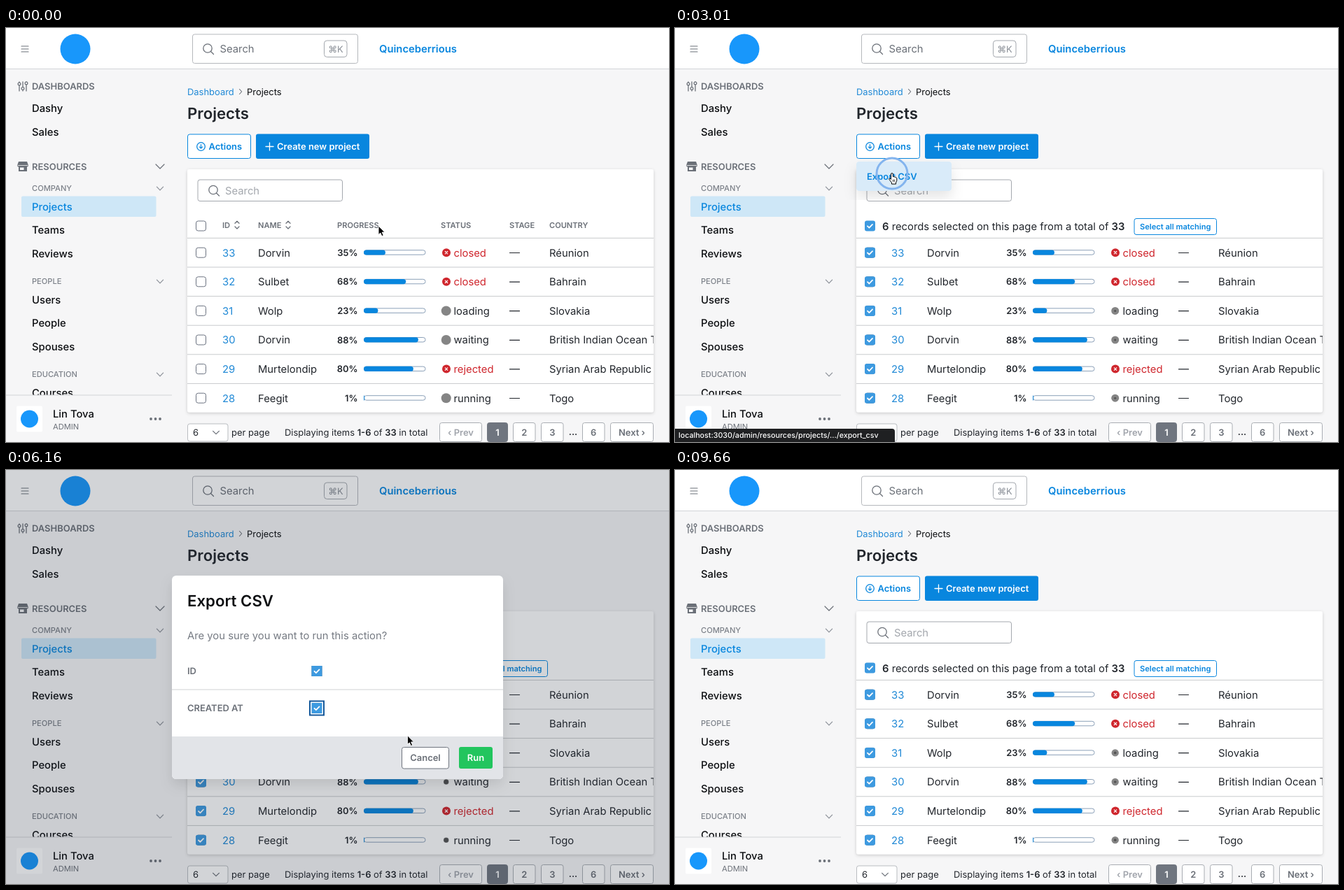
Write an HTML page that moves like this. It is 947 by 592 pixels and loops after 9.73 s.

```html
<!DOCTYPE html>
<html lang="en">
<head>
<meta charset="utf-8">
<title>Export CSV action</title>
<style>
html, body { margin: 0; width: 100%; height: 100%; overflow: hidden; background: #f6f6f7; }
svg { display: block; width: 947px; height: 592px; font-family: Inter, sans-serif; text-rendering: geometricPrecision; }
text { white-space: pre; }
</style>
</head>
<body>
<svg id="stage" viewBox="0 0 947 592"></svg>
<script>
const LOOP = 9730;
const BLUE = '#0886de', INK = '#22262c', GRAY = '#6b7078', LINE = '#c8cacd', RED = '#cf262d';
const SMALL = 11.1, MEDIUM = 12.95, BASE = 14.8, LARGE = 22.2;
const CLICKS = { select: 910, actions: 2170, exportItem: 2950, id: 4750, created: 5600, run: 6550 };
const MODAL = [3040, 7350];
const ROWS = [
  [33, 'Dorvin', 35, 'closed', 'Réunion'],
  [32, 'Sulbet', 68, 'closed', 'Bahrain'],
  [31, 'Wolp', 23, 'loading', 'Slovakia'],
  [30, 'Dorvin', 88, 'waiting', 'British Indian Ocean Territory'],
  [29, 'Murtelondip', 80, 'rejected', 'Syrian Arab Republic'],
  [28, 'Feegit', 1, 'running', 'Togo']
];
const ROW_TOP = 300.4, ROW_HEIGHT = 41.6;

// Drawing helpers; text is placed by the middle of its capitals.
const text = (x, y, content, size = BASE, fill = INK, weight = 400, anchor = 'start') =>
  `<text x="${x}" y="${y + size * 0.36}" font-size="${size}" fill="${fill}" font-weight="${weight}" text-anchor="${anchor}">${content}</text>`;
const rect = (x, y, w, h, fill, radius = 0, stroke = 'none', extra = '') =>
  `<rect x="${x}" y="${y}" width="${w}" height="${h}" rx="${radius}" fill="${fill}" stroke="${stroke}" ${extra}/>`;
const circle = (x, y, r, fill, extra = '') => `<circle cx="${x}" cy="${y}" r="${r}" fill="${fill}" ${extra}/>`;
const path = (d, stroke, width = 1.2, extra = '') =>
  `<path d="${d}" fill="none" stroke="${stroke}" stroke-width="${width}" stroke-linecap="round" stroke-linejoin="round" ${extra}/>`;
const group = (id, content, extra = '') => `<g id="${id}" ${extra}>${content}</g>`;
const chevron = (x, y, half, color = GRAY) => path(`M${x - half} ${y - half / 2}l${half} ${half}l${half} ${-half}`, color, 1.2);
const magnifier = (x, y) => circle(x - 1, y - 1, 6.2, 'none', `stroke="${GRAY}" stroke-width="1.3"`) + path(`M${x + 3.5} ${y + 3.5}l4 4`, GRAY, 1.3);
const emptyBox = (x, y, radius = 3) => rect(x - 7, y - 7, 14, 14, '#fff', radius, '#6b7280');
const checkedBox = (x, y, radius = 3) =>
  rect(x - 7.5, y - 7.5, 15, 15, '#3d9ae0', radius) + path(`M${x - 3.5} ${y + .3}l2.4 2.4l4.6 -4.8`, '#fff', 1.8);
const focusRing = (x, y, radius) => rect(x - 10, y - 10, 20, 20, '#fff', radius, '#14589b', 'stroke-width="2"');
const button = (x, y, w, h, label, color = GRAY, stroke = '#a9adb3', fill = '#fff', size = MEDIUM) =>
  rect(x, y, w, h, fill, 3, stroke) + text(x + w / 2, y + h / 2, label, size, color, 600, 'middle');

function header() {
  return rect(0, 0, 947, 58, '#fff') + rect(0, 58, 947, 1, '#d3d5d8')
    + [26, 30, 34].map(y => path(`M22 ${y}h10`, GRAY, 1.1)).join('')
    + circle(99, 30, 21.5, '#1897fb')
    + rect(266.5, 9, 236, 41.5, '#fff', 3, '#b5b8bc') + magnifier(289, 30)
    + text(305.5, 30, 'Search', BASE, GRAY)
    + rect(454.5, 18, 32.5, 23.5, '#fff', 4, '#a4a8ae') + text(471, 30, '⌘K', MEDIUM, '#8a8f97', 400, 'middle')
    + text(533, 30, 'Quinceberrious', BASE, BLUE, 600);
}

function sidebar() {
  const section = (y, label) => text(37, y, label, MEDIUM, GRAY, 600);
  const subsection = (y, label) => text(37, y, label, SMALL, '#7c8189', 500) + chevron(220, y, 4.6, '#8b9098');
  const item = (y, label, color = '#0c0e11') => text(37, y, label, BASE, color, 500);
  const sliders = [[19, 80], [24, 86.5], [29, 79]].map(([x, y]) => path(`M${x} 77v13`, GRAY, 1.3) + circle(x, y, 1.9, '#f6f6f7', `stroke="${GRAY}" stroke-width="1.2"`)).join('');
  const store = `<path d="M18 191h12l2 5.5a2 2 0 0 1-2 2v6.5H18v-6.5a2 2 0 0 1-2-2z" fill="${GRAY}"/>`
    + rect(20, 199.5, 5.5, 3.5, '#f6f6f7') + path('M17 196.5h14', '#f6f6f7', .8);
  return sliders + section(83.5, 'DASHBOARDS') + item(115, 'Dashy') + item(148.5, 'Sales')
    + store + section(198, 'RESOURCES') + chevron(220, 198, 6)
    + subsection(229.5, 'COMPANY') + rect(22, 240.5, 192.5, 29.5, '#cee7f7', 2)
    + item(255.5, 'Projects', BLUE) + item(289, 'Teams') + item(322.5, 'Reviews')
    + subsection(362.5, 'PEOPLE') + item(389, 'Users') + item(422, 'People') + item(455.5, 'Spouses')
    + subsection(495.5, 'EDUCATION') + item(522, 'Courses')
    + rect(0, 525, 237, 67, '#f6f6f7') + rect(0, 524.5, 237, 1, '#d3d5d8')
    + rect(15, 540.5, 37, 37, '#fff', 2) + circle(33.5, 559, 12.5, '#1897fb')
    + text(67, 552, 'Lin Tova', BASE, '#0c0e11', 500) + text(67, 570, 'ADMIN', SMALL, GRAY)
    + [207, 213.5, 220].map(x => circle(x, 559, 1.9, GRAY)).join('');
}

function tableRow([id, name, progress, status, country], i) {
  const y = 321.2 + i * ROW_HEIGHT;
  const failed = status === 'closed' || status === 'rejected';
  const icon = failed
    ? circle(629, y, 6, RED) + path(`M627.3 ${y - 1.7}l3.4 3.4m0 -3.4l-3.4 3.4`, '#fff', 1.2)
    : [0, 1].map(k => circle(628.7, y, 7, '#333', `class="pulse${k}" opacity=".6"`)).join('');
  return rect(259, ROW_TOP + i * ROW_HEIGHT, 666, ROW_HEIGHT, '#eef0f0', 0, 'none', `id="hover${i}"`)
    + rect(259, ROW_TOP + i * ROW_HEIGHT - .5, 666, 1, LINE)
    + emptyBox(278.5, y) + `<g class="selected">${checkedBox(278.5, y)}</g>`
    + text(309, y, id, BASE, '#2089d6') + text(360, y, name)
    + text(502.5, y, progress + '%', MEDIUM, INK, 600, 'end')
    + rect(511.5, y - 3.5, 87.5, 6.5, '#fff', 3.2, '#8ba0b8') + rect(511, y - 3.8, progress * .885, 7.2, BLUE, Math.min(3.6, progress * .44))
    + icon + text(639.5, y, status, BASE, failed ? RED : INK)
    + path(`M719.5 ${y + .3}h14`, INK, 1.2) + text(776, y, country);
}

function content() {
  const heading = (x, label) => text(x, 282, label, SMALL, GRAY, 600);
  const sorter = x => path(`M${x - 3} 279.3l3 -3l3 3M${x - 3} 284l3 3l3 -3`, GRAY, 1.3);
  return text(259, 91, 'Dashboard', MEDIUM, '#2089d6') + path('M333.5 87.5l3.2 3.5l-3.2 3.5', GRAY, 1.1)
    + text(344, 91, 'Projects', MEDIUM, '#0c0e11') + text(259, 122, 'Projects', LARGE, INK, 600)
    + rect(259.5, 152, 90, 34.5, '#fff', 3, BLUE, 'id="actionsButton"')
    + circle(278.5, 169.5, 5.8, 'none', `stroke="${BLUE}" stroke-width="1.3"`)
    + path('M278.5 166.5v5.5m-2.3 -2.2l2.3 2.3l2.3 -2.3', BLUE, 1.2)
    + text(289.5, 169.5, 'Actions', MEDIUM, BLUE, 600)
    + rect(357, 151.5, 162, 35.5, BLUE, 3) + path('M376.5 164v11m-5.5 -5.5h11', '#fff', 1.3)
    + text(387, 169.5, 'Create new project', MEDIUM, '#fff', 600)
    + rect(259, 202, 666, 347.5, '#fff', 3, 'none', 'filter="url(#cardShadow)"')
    + rect(274, 217, 206.5, 30.5, '#fff', 3, '#a4a8ae') + magnifier(297, 232.5) + text(313, 232.5, 'Search', BASE, '#a3a7ad')
    + group('columns', emptyBox(278.5, 283) + heading(309, 'ID') + sorter(330) + heading(360, 'NAME') + sorter(403)
      + heading(473, 'PROGRESS') + heading(621, 'STATUS') + heading(719, 'STAGE') + heading(776, 'COUNTRY'))
    + group('selection', `<g id="selectFocus">${focusRing(278.5, 283, 4)}</g>` + checkedBox(278.5, 283)
      + text(296, 284, '<tspan font-weight="600">6</tspan> records selected on this page from a total of <tspan font-weight="600">33</tspan>')
      + button(656, 272.5, 117.5, 23, 'Select all matching', BLUE, BLUE, '#fff', SMALL))
    + group('rows', ROWS.map(tableRow).join(''), 'clip-path="url(#cardClip)"')
    + rect(259.5, 566, 57.5, 25, '#fff', 3, '#b9bcc1') + text(267, 578.5, '6', MEDIUM) + chevron(300, 578.5, 4.4)
    + text(322, 578.5, 'per page', MEDIUM)
    + text(398, 578.5, 'Displaying items <tspan font-weight="600">1-6</tspan> of <tspan font-weight="600">33</tspan> in total', MEDIUM)
    + button(619.5, 564.5, 60, 27, '‹ Prev', '#a0a4ab') + button(687.5, 564.5, 29, 27, '1', '#fff', '#6f757f', '#6f757f')
    + button(724.5, 564.5, 31.5, 27, '2') + button(764.5, 564.5, 31.5, 27, '3')
    + text(810, 577, '...', MEDIUM, INK, 600, 'middle')
    + button(823.5, 564.5, 31.5, 27, '6') + button(863.5, 564.5, 61, 27, 'Next ›');
}

function modal() {
  const field = (y, label, id) => text(259, y, label, MEDIUM, GRAY, 600) + emptyBox(444, y, 0)
    + group(id + 'Focus', focusRing(444, y, 0)) + group(id + 'Checked', checkedBox(444, y, 0));
  return rect(0, 0, 947, 592, 'rgba(31,41,55,.2)')
    + rect(237, 151, 473, 291, '#fff', 6, 'none', 'filter="url(#modalShadow)"')
    + text(259, 187.5, 'Export CSV', LARGE, '#0c0e11', 600)
    + text(259, 236.5, 'Are you sure you want to run this action?', BASE, '#767b83')
    + field(287.5, 'ID', 'id') + rect(237, 313.5, 473, 1, '#cfd1d4') + field(340.5, 'CREATED AT', 'created')
    + '<path d="M237 381h473v55a6 6 0 0 1-6 6h-461a6 6 0 0 1-6-6z" fill="#e2e4e8"/>'
    + button(565.5, 396.5, 67, 30.5, 'Cancel', GRAY, '#6f757f')
    + rect(647, 396, 48, 31, '#22c55e', 3, 'none', 'id="runButton"') + text(671, 411.5, 'Run', MEDIUM, '#fff', 600, 'middle');
}

const menu = rect(259, 191, 136, 42, '#fff', 4, 'none', 'filter="url(#modalShadow)"')
  + rect(259, 191, 136, 42, '#d9ebf9', 4, 'none', 'id="menuHover"') + text(274, 212, 'Export CSV', MEDIUM, BLUE, 600);
const statusBar = '<path id="statusShape" d="M0 573h310q4 0 4 4v15h-314z"/>'
  + '<text id="statusText" x="5" y="586" font-size="10.7" font-weight="500" fill="#fff"></text>';
const download = circle(0, 0, 33.5, '#f4f5f6')
  + '<path d="M-4.5-13h9v9h5l-9.500 10.500l-9.500-10.500h5z" fill="#5c95f0"/>' + rect(-15, 18, 30, 3, '#5c95f0');
const arrow = '<path d="M0 0v12.500l2.800-2.500l2.100 4.600l2.300-1l-2.100-4.500h3.900z" fill="#000" stroke="#fff" stroke-width=".9"/>';
const hand = '<path d="M-1.500 6.500v-5.500a1.400 1.400 0 0 1 2.800 0v3.500l1.400.2l1.600.4l1.500.5l1 1.200v3.500l-1.300 2.800v2h-6v-2l-3-3.700q-1.500-2-.2-2.500q.9-.2 2.200 1.600z" fill="#fff" stroke="#000" stroke-width="1"/>'
  + path('M1.500 9v2.500m1.900 -2.500v2.500', '#000', .8);
const beamShape = 'M-3 -7.500q3 0 3 2v11q0 2 -3 2M3 -7.500q-3 0 -3 2M3 7.500q-3 0 -3 -2M-1.500 1.500h3';
const beam = path(beamShape, '#fff', 2.6) + path(beamShape, '#222', 1.1);

const shadow = (id, dy, blur, opacity) =>
  `<filter id="${id}" x="-20%" y="-20%" width="140%" height="150%"><feDropShadow dx="0" dy="${dy}" stdDeviation="${blur}" flood-opacity="${opacity}"/></filter>`;

document.getElementById('stage').innerHTML =
  `<defs><clipPath id="cardClip"><rect x="259" y="202" width="666" height="347.500"/></clipPath>
  ${shadow('cardShadow', 1.5, 2, .18)}${shadow('modalShadow', 9, 9, .1)}</defs>`
  + rect(0, 0, 947, 592, '#f6f6f7') + sidebar() + header() + content()
  + group('menu', menu) + group('modal', modal()) + group('status', statusBar) + group('download', download)
  + circle(0, 0, 20, 'none', 'id="ring" stroke="#83b4ee"')
  + group('cursor', group('arrow', arrow) + group('hand', hand) + group('beam', beam));

// Cursor stops: time, x, y.
const STOPS = [
  [250, 532, 283], [780, 279, 283], [1250, 279, 283], [1780, 310, 182], [2450, 310, 182], [2850, 310, 208],
  [3700, 310, 208], [4500, 444, 284], [5050, 444, 284], [5450, 444, 338], [5900, 444, 338], [6380, 673, 412],
  [7400, 673, 412], [7600, 671, 415], [8200, 671, 415], [8760, 700, -30]
];
const $ = id => document.getElementById(id);
const show = (node, visible) => node.style.display = visible ? '' : 'none';
const between = (t, from, to) => t >= from && t < to;
const ease = p => p * p * (3 - 2 * p);

function cursorAt(t) {
  const next = STOPS.findIndex(stop => stop[0] > t);
  if (next === 0) return STOPS[0].slice(1);
  if (next < 0) return STOPS[STOPS.length - 1].slice(1);
  const [t0, x0, y0] = STOPS[next - 1], [t1, x1, y1] = STOPS[next];
  const p = ease((t - t0) / (t1 - t0));
  return [x0 + (x1 - x0) * p, y0 + (y1 - y0) * p];
}

function drawCursor(t, x, y) {
  const isBeam = between(t, 6800, MODAL[1]);
  const isHand = between(t, 1640, MODAL[0]) || between(t, 6320, 6800);
  show($('beam'), isBeam);
  show($('hand'), isHand);
  show($('arrow'), !isBeam && !isHand);
  $('cursor').setAttribute('transform', `translate(${x} ${y})`);

  const click = Object.values(CLICKS).find(start => between(t, start, start + 400));
  show($('ring'), click !== undefined);
  if (click === undefined) return;
  const p = (t - click) / 400, ring = $('ring');
  ring.setAttribute('cx', x);
  ring.setAttribute('cy', y);
  ring.setAttribute('r', 20 + 13 * p);
  ring.setAttribute('stroke-width', 3.4 - 2.7 * p);
  ring.setAttribute('opacity', Math.min(1, 1.25 * (1 - p)));
}

function drawStatus(t) {
  const linkHover = between(t, 2980, 3600), waiting = between(t, 6620, 7300);
  show($('status'), linkHover || waiting);
  $('statusShape').setAttribute('fill', waiting ? 'rgba(60,60,62,.6)' : '#1f2022');
  $('statusText').textContent = waiting ? 'Waiting for localhost...' : 'localhost:3030/admin/resources/projects/.../export_csv';

  const p = (t - 6690) / 600;
  show($('download'), between(p, 0, 1));
  $('download').setAttribute('transform', `translate(33 ${458 + 100 * p})`);
  $('download').setAttribute('opacity', 1 - 4 * (p - .5) ** 2);
}

function render(t) {
  const [x, y] = cursorAt(t);
  const selected = t >= CLICKS.select, modalOpen = between(t, ...MODAL);
  show($('columns'), !selected);
  show($('selection'), selected);
  show($('selectFocus'), t < CLICKS.exportItem);
  document.querySelectorAll('.selected').forEach(node => show(node, selected));
  $('actionsButton').setAttribute('fill', between(t, 1640, 2600) ? '#d9ebf9' : '#fff');
  show($('menu'), between(t, CLICKS.actions + 60, MODAL[0]));
  show($('menuHover'), y > 191);

  const hovered = modalOpen ? -1 : Math.floor((y - ROW_TOP) / ROW_HEIGHT);
  ROWS.forEach((row, i) => show($('hover' + i), i === hovered));

  show($('modal'), modalOpen);
  show($('idChecked'), t >= CLICKS.id);
  show($('idFocus'), between(t, CLICKS.id, CLICKS.created));
  show($('createdChecked'), t >= CLICKS.created);
  show($('createdFocus'), between(t, CLICKS.created, CLICKS.run));
  $('runButton').setAttribute('fill', t > 6300 ? '#14a44a' : '#22c55e');

  // Two discs bounce in opposite phase.
  const beat = t / 1115;
  const swing = ease(Math.abs(beat % 2 - 1));
  [swing, 1 - swing].forEach((scale, k) =>
    document.querySelectorAll('.pulse' + k).forEach(disc => disc.setAttribute('r', 7 * scale)));

  drawStatus(t);
  drawCursor(t, x, y);
}

function tick() {
  render(performance.now() % LOOP);
  requestAnimationFrame(tick);
}
tick();
</script>
</body>
</html>
```
